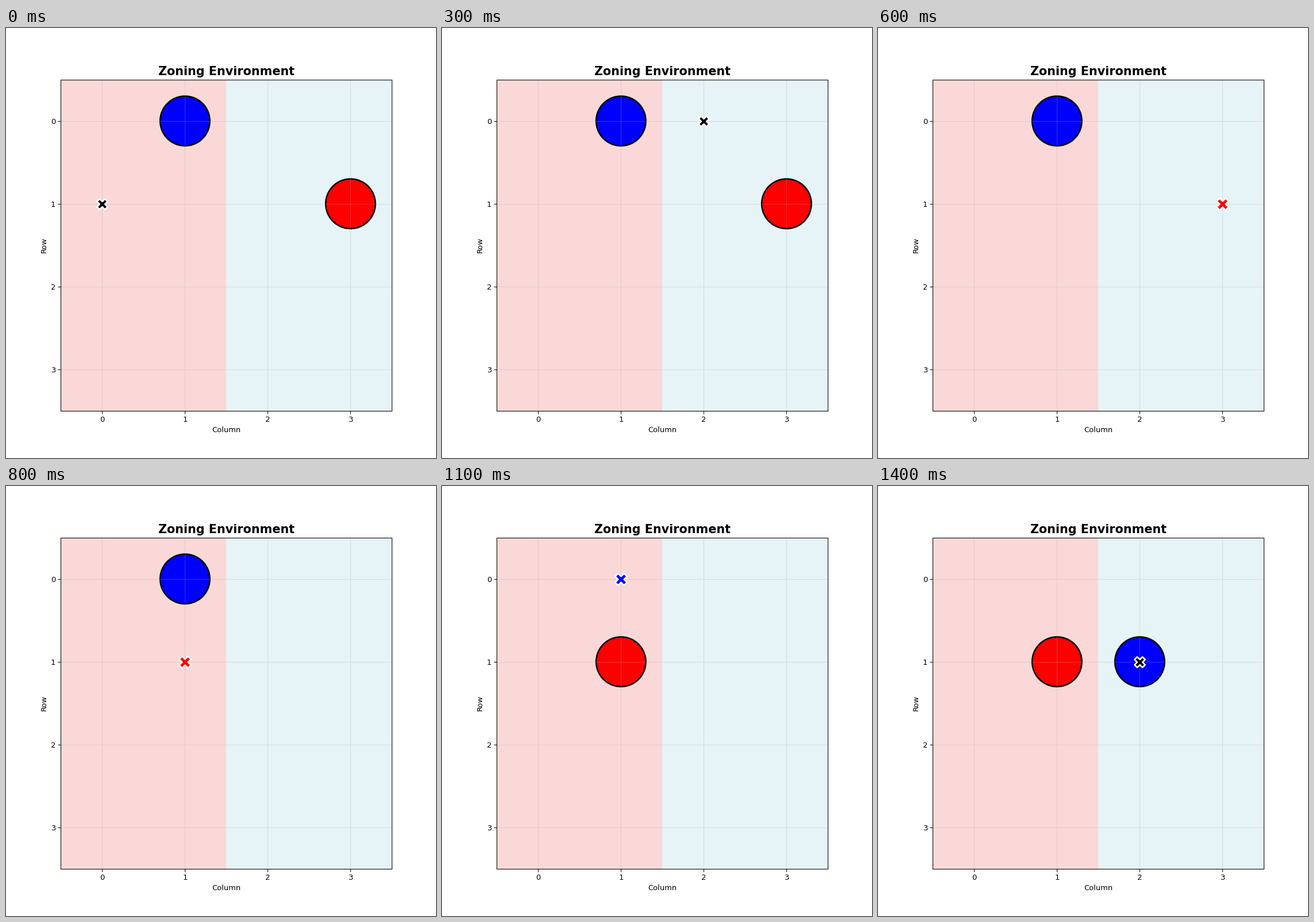
These frames come from a looping animation (748 px wide and 748 px high, 1.5 s). A matplotlib script:

```python
import matplotlib.pyplot as plt
from matplotlib.animation import FuncAnimation
from matplotlib.patches import Circle, Rectangle

SIZE, INCHES = 748, 8
STEP_MS = 100

# Agent cell (column, row) after each step
PATH = [(0, 1), (0, 0), (1, 0), (2, 0), (3, 0), (3, 1),
        (3, 1), (2, 1), (1, 1), (1, 1), (1, 0), (1, 0),
        (2, 0), (2, 1), (2, 1)]

# Each ball: start cell, pick-up step, drop step, drop cell
BALLS = {
    "red": ((3, 1), 6, 9, (1, 1)),
    "blue": ((1, 0), 11, 14, (2, 1)),
}

plt.rcParams["font.family"] = "DejaVu Sans"
fig, ax = plt.subplots(figsize=(INCHES, INCHES), dpi=SIZE / INCHES)
ax.set_xlim(-0.5, 3.5)
ax.set_ylim(3.5, -0.5)
ax.set_aspect("equal")
ax.set_xticks(range(4))
ax.set_yticks(range(4))
ax.set_xlabel("Column")
ax.set_ylabel("Row")
ax.set_title("Zoning Environment", fontsize=16, fontweight="bold")
ax.grid(True, alpha=0.3)

for left, color in ((-0.5, "lightcoral"), (1.5, "lightblue")):
    ax.add_patch(Rectangle((left, -0.5), 2, 4, facecolor=color,
                           edgecolor="none", alpha=0.3))

circles = {
    name: ax.add_patch(Circle(ball[0], 0.3, facecolor=name,
                              edgecolor="black", linewidth=2))
    for name, ball in BALLS.items()
}
agent = ax.scatter([0], [1], marker="X", s=200, c="black",
                   edgecolors="white", linewidths=2, zorder=5)


def update(step):
    carried = None
    for name, (start, pick, drop, end) in BALLS.items():
        held = pick <= step < drop
        if held:
            carried = name
        circles[name].set_visible(not held)
        circles[name].center = end if step >= drop else start

    agent.set_offsets([PATH[step]])
    agent.set_facecolor(carried or "black")
    agent.set_sizes([250 if carried else 200])
    return [agent, *circles.values()]


anim = FuncAnimation(fig, update, frames=len(PATH), interval=STEP_MS,
                     repeat=True, repeat_delay=0)
plt.show()
```
